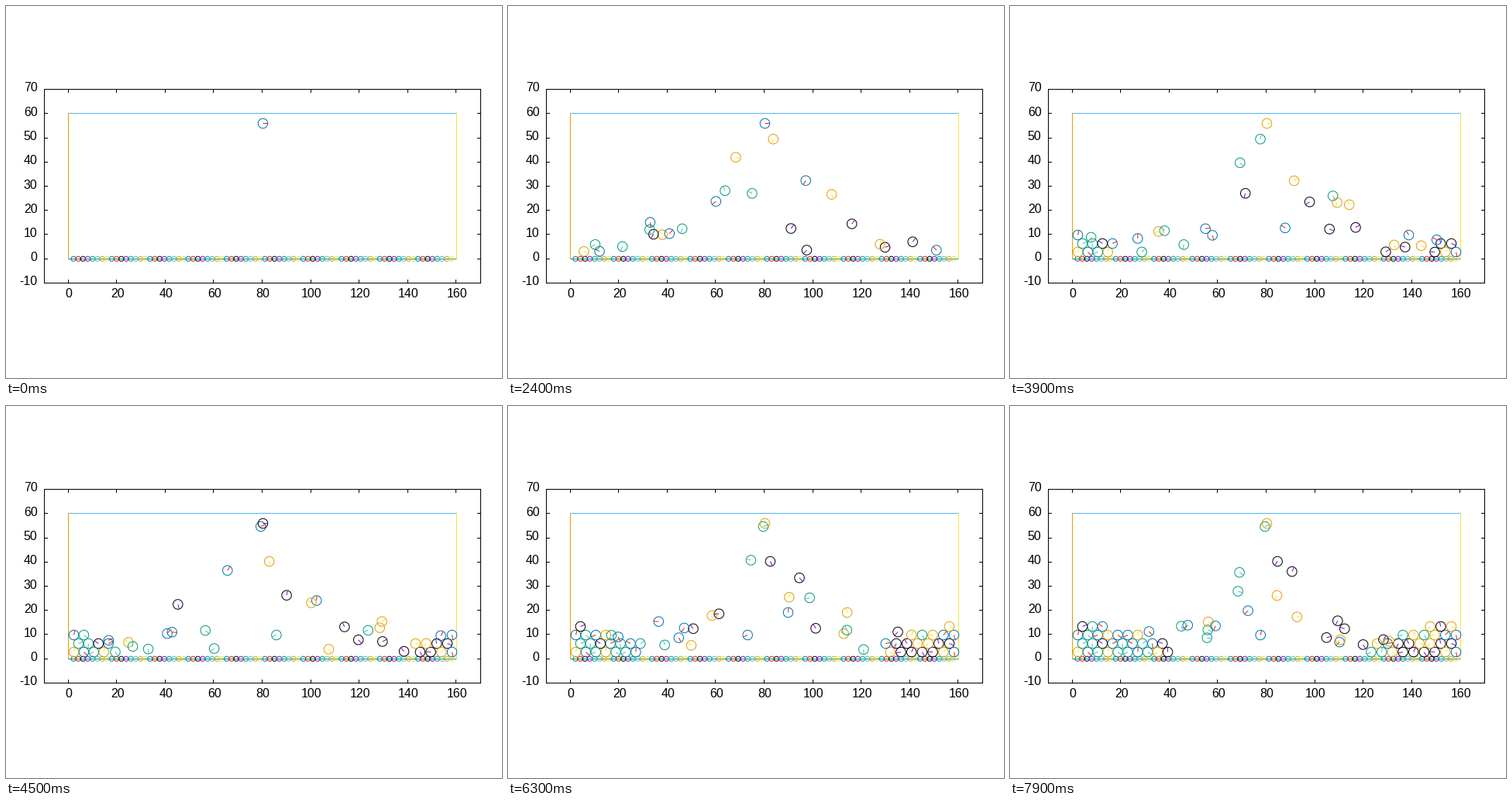
Animation of 640 by 480 pixels, one loop 8000 ms. Source, as a matplotlib script:

```python
import numpy as np
import matplotlib.pyplot as plt
from matplotlib.animation import FuncAnimation
from matplotlib.collections import LineCollection

W, H, DPI = 640, 480, 100
PX = 72 / DPI
plt.rcParams["font.family"] = "Liberation Sans"

PALETTE = ["#9400d3", "#009e73", "#56b4e9", "#e69f00",
           "#f0e442", "#0072b2", "#e51e10", "#000000"]
FRAMES, STEP = 80, 100
SPAWN_X, SPAWN_Y, FLOOR = 331, 151, 317
GRAVITY = 50                      # pixels per frame squared
RADIUS = 6.25
DROP = FLOOR - SPAWN_Y
FALL = np.sqrt(2 * DROP / GRAVITY)

# One ball enters per frame and loses a fixed share of speed at each bounce,
# so its hops add up to a finite time after which it rests on a pile.
rng = np.random.default_rng(7)
ids = np.arange(FRAMES)
release = ids + np.where(ids < 40, 0.1, 0.6)
bounce = rng.uniform(0.78, 0.86, FRAMES)
hop_time = 2 * FALL * bounce / (1 - bounce)
life = FALL + hop_time
left_odds = np.array([0.75, 0.3, 0.7, 0.5])
goes_left = rng.random(FRAMES) < left_odds[ids % 4]


def pile(wall, pitch, count):
    """Resting places of a heap of staggered rows leaning on a wall."""
    cells = [(row, col) for row in range(5) for col in range(25)]
    cells.sort(key=lambda c: c[1] + 0.7 * c[0] ** 2)
    inward = np.sign(pitch)
    return [(wall + pitch * col + inward * 6 * shift, FLOOR - 11 * row)
            for row, col in cells[:count]
            for shift in [row % 2]]


def assign_rest():
    """Give each ball a place in its heap, in the order of settling."""
    rest = np.zeros((FRAMES, 2))
    for side, wall, pitch in ((True, 87, 12.9), (False, 575, -13.7)):
        group = ids[goes_left == side]
        group = group[np.argsort((release + life)[group])]
        rest[group] = pile(wall, pitch, len(group))
    return rest


rest = assign_rest()


def positions(t):
    age = np.clip(t - release, 0, life)
    s = age / life
    x = SPAWN_X + (rest[:, 0] - SPAWN_X) * (1 - (1 - s) ** 1.3)

    # Free fall, then the hop that is under way
    tau = np.clip(age - FALL, 0, hop_time * 0.9999)
    k = np.floor(np.log(1 - tau / hop_time) / np.log(bounce))
    v = tau - hop_time * (1 - bounce ** k)
    length = 2 * FALL * bounce ** (k + 1)
    height = np.where(age < FALL, DROP - GRAVITY / 2 * age ** 2,
                      GRAVITY / 2 * v * (length - v))
    ground = FLOOR + (rest[:, 1] - FLOOR) * s ** 3
    return x, ground - height


TURN = np.linspace(0, 2 * np.pi, 41)
UNIT = np.column_stack([np.cos(TURN), np.sin(TURN)])


def ring(x, y, r):
    return UNIT * r + (x + 0.5, y + 0.5)


def px(u):
    return 49 + (u + 10) * 563 / 180


def py(v):
    return 357 - (v + 10) * 250 / 80


fig = plt.figure(figsize=(W / DPI, H / DPI), dpi=DPI, facecolor="white")
ax = fig.add_axes([0, 0, 1, 1])
ax.set_xlim(0, W)
ax.set_ylim(H, 0)
ax.axis("off")


def line(xs, ys, color, z=1):
    ax.plot(np.add(xs, 0.5), np.add(ys, 0.5), color=color, lw=PX,
            snap=False, solid_capstyle="projecting",
            solid_joinstyle="miter", zorder=z)


def strokes(segments, colors, z):
    group = LineCollection(segments, colors=colors, linewidths=PX, zorder=z)
    group.set_snap(False)
    return ax.add_collection(group)


def label(x, y, text, ha):
    ax.text(x, y, text, size=16 * PX, ha=ha, va="baseline")


# Container walls
line([80, 581], [326, 326], PALETTE[1])
line([80, 581], [138, 138], PALETTE[2])
line([80, 80], [138, 326], PALETTE[3])
line([581, 581], [138, 326], PALETTE[4])

# Fixed floor beads
strokes([ring(px(2 + 156 * k / 79), 325.7, 3.1) for k in range(80)],
        [PALETTE[(5 + k) % 8] for k in range(80)], 2)

# Frame, ticks and labels
line([49, 612, 612, 49, 49], [107, 107, 357, 357, 107], "black", 4)
for u in range(0, 161, 20):
    x = int(px(u))
    line([x, x], [353, 357], "black", 4)
    line([x, x], [107, 111], "black", 4)
    label(px(u) + 1, 376, str(u), "center")
for v in range(-10, 71, 10):
    y = round(py(v))
    line([49, 53], [y, y], "black", 4)
    line([608, 612], [y, y], "black", 4)
    label(40.5, py(v) + 3.5, str(v), "right")

balls = strokes([], [], 3)


def update(t):
    segments, colors = [], []
    for n, (x, y) in enumerate(zip(*positions(t))):
        if n > t:
            break
        spin = (x - SPAWN_X) / RADIUS
        center = np.array([x + 0.5, y + 0.5])
        tip = center + RADIUS * np.array([np.cos(spin), np.sin(spin)])
        c = 5 + 2 * (n % 4)
        segments += [ring(x, y, RADIUS), np.array([center, tip])]
        colors += [PALETTE[c % 8], PALETTE[(c + 1) % 8]]
    balls.set_segments(segments)
    balls.set_color(colors)
    return [balls]


anim = FuncAnimation(fig, update, frames=FRAMES, interval=STEP,
                     repeat=True, repeat_delay=0, blit=False)
plt.show()
```
